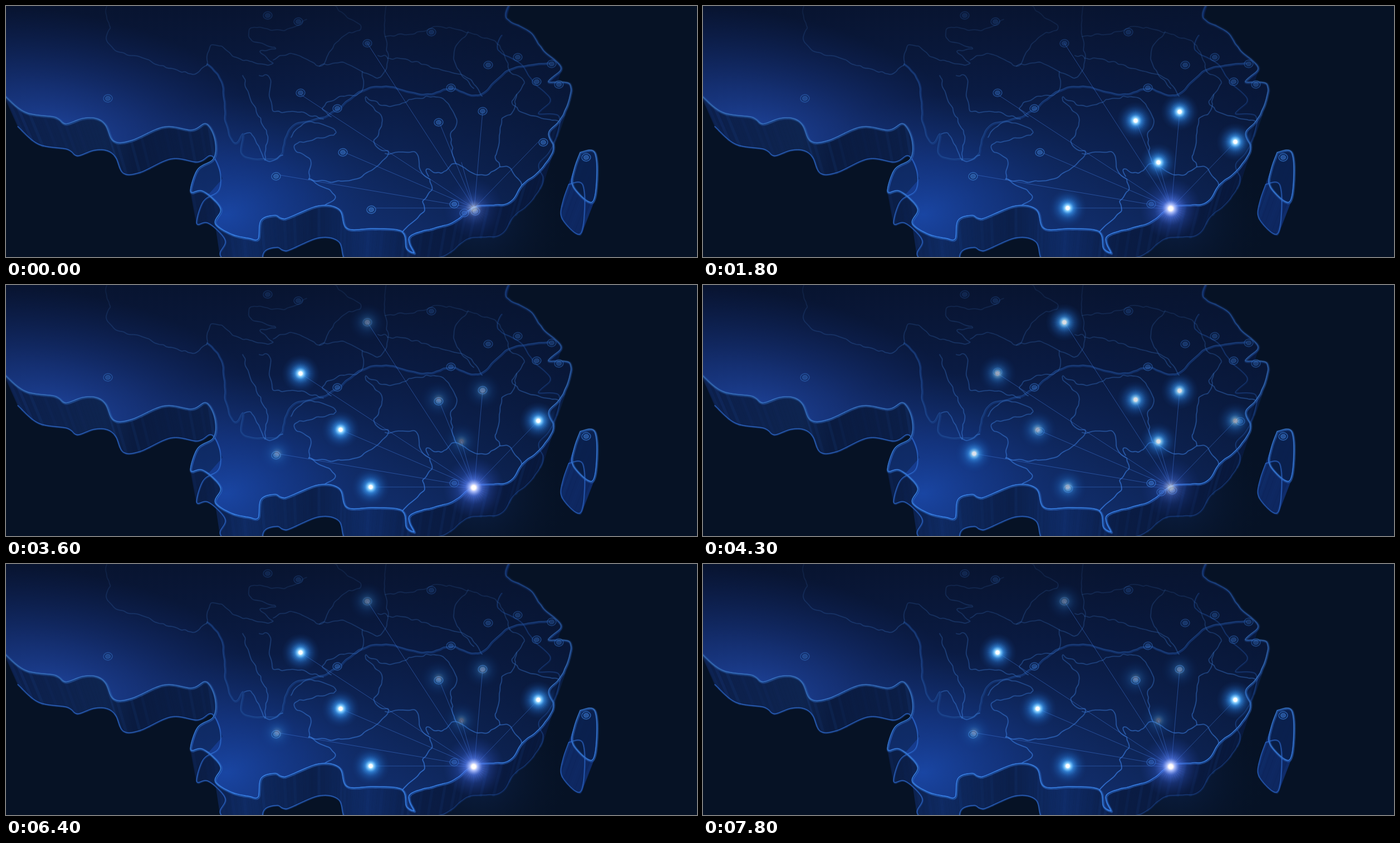
Write an HTML page that moves like this. It is 1241 by 451 pixels and loops after 8000 ms.

```html
<!DOCTYPE html>
<html lang="en">
<head>
<meta charset="utf-8">
<title>Night map</title>
<style>
html, body { margin: 0; width: 100%; height: 100%; overflow: hidden; background: #061225; }
svg { display: block; width: 100vw; height: 100vh; }
path, line { fill: none; stroke-linejoin: round; stroke-linecap: round; }
</style>
</head>
<body>
<svg id="stage" viewBox="0 0 1241 451" preserveAspectRatio="none">
  <defs>
    <linearGradient id="land" gradientUnits="userSpaceOnUse" x1="0" y1="0" x2="0" y2="451">
      <stop offset="0" stop-color="#081430"/><stop offset=".35" stop-color="#0a1b43"/>
      <stop offset=".75" stop-color="#0f285f"/><stop offset="1" stop-color="#123071"/>
    </linearGradient>
    <radialGradient id="southGlow" gradientUnits="userSpaceOnUse" cx="0" cy="0" r="1" gradientTransform="translate(395 375) rotate(-12) scale(320 210)">
      <stop offset="0" stop-color="#1b4aad" stop-opacity=".85"/><stop offset=".45" stop-color="#173f9a" stop-opacity=".48"/>
      <stop offset="1" stop-color="#12306f" stop-opacity="0"/>
    </radialGradient>
    <radialGradient id="westGlow" gradientUnits="userSpaceOnUse" cx="0" cy="0" r="1" gradientTransform="translate(90 235) rotate(10) scale(430 225)">
      <stop offset="0" stop-color="#2047a2" stop-opacity=".95"/><stop offset=".4" stop-color="#1a3a8a" stop-opacity=".65"/>
      <stop offset="1" stop-color="#12296a" stop-opacity="0"/>
    </radialGradient>
    <linearGradient id="eastShade" gradientUnits="userSpaceOnUse" x1="700" y1="0" x2="1010" y2="0">
      <stop offset="0" stop-color="#07142f" stop-opacity="0"/><stop offset="1" stop-color="#07142f" stop-opacity=".55"/>
    </linearGradient>
    <linearGradient id="wall" gradientUnits="userSpaceOnUse" x1="0" y1="0" x2="1000" y2="0">
      <stop offset="0" stop-color="#0c1f4b"/><stop offset=".18" stop-color="#0e244f"/>
      <stop offset=".23" stop-color="#0a1b40"/><stop offset=".36" stop-color="#0b1e47"/>
      <stop offset=".43" stop-color="#0f2a62"/><stop offset=".55" stop-color="#0b1f4a"/>
      <stop offset=".65" stop-color="#0f2b66"/><stop offset=".75" stop-color="#0a1c44"/>
      <stop offset="1" stop-color="#08173a"/>
    </linearGradient>
    <linearGradient id="edge" gradientUnits="userSpaceOnUse" x1="0" y1="0" x2="0" y2="451">
      <stop offset="0" stop-color="#3767a8" stop-opacity=".22"/><stop offset=".4" stop-color="#4582ca" stop-opacity=".75"/>
      <stop offset=".7" stop-color="#3f86e4" stop-opacity=".95"/><stop offset="1" stop-color="#3d8cf8"/>
    </linearGradient>
    <linearGradient id="border" gradientUnits="userSpaceOnUse" x1="0" y1="0" x2="0" y2="400">
      <stop offset="0" stop-color="#2d5590" stop-opacity=".18"/><stop offset=".35" stop-color="#3063ad" stop-opacity=".5"/>
      <stop offset="1" stop-color="#397fe8" stop-opacity=".95"/>
    </linearGradient>
    <radialGradient id="sea" gradientUnits="userSpaceOnUse" cx="850" cy="380" r="170">
      <stop offset="0" stop-color="#12306d" stop-opacity=".45"/><stop offset="1" stop-color="#061225" stop-opacity="0"/>
    </radialGradient>
    <radialGradient id="spark">
      <stop offset="0" stop-color="#fff"/><stop offset=".1" stop-color="#eefaff"/>
      <stop offset=".18" stop-color="#86d0ff" stop-opacity=".95"/><stop offset=".32" stop-color="#3a96ee" stop-opacity=".7"/>
      <stop offset=".55" stop-color="#2470cc" stop-opacity=".4"/><stop offset=".8" stop-color="#1c5cb4" stop-opacity=".13"/>
      <stop offset="1" stop-color="#174f9f" stop-opacity="0"/>
    </radialGradient>
    <radialGradient id="hubSpark">
      <stop offset="0" stop-color="#fff"/><stop offset=".08" stop-color="#fff8f4"/>
      <stop offset=".14" stop-color="#b4c4ff" stop-opacity=".92"/><stop offset=".28" stop-color="#557cf0" stop-opacity=".66"/>
      <stop offset=".55" stop-color="#3158c8" stop-opacity=".34"/><stop offset="1" stop-color="#203d98" stop-opacity="0"/>
    </radialGradient>
  </defs>
</svg>
<script>
const stage = document.getElementById('stage');

function add(tag, attrs, parent = stage) {
  const el = document.createElementNS('http://www.w3.org/2000/svg', tag);
  for (const key in attrs) el.setAttribute(key, attrs[key]);
  parent.append(el);
  return el;
}

let seed = 11;
const random = () => (seed = seed * 16807 % 2147483647) / 2147483647;
const points = text => text.trim().split(/\s+/).map(pair => pair.split(',').map(Number));

// Samples a Catmull-Rom spline through key points and roughens it with seeded jitter.
function trace(text, rough = 0, step = 8) {
  const p = points(text), out = [];
  for (let i = 0; i < p.length - 1; i++) {
    const a = p[i - 1] || p[i], b = p[i], c = p[i + 1], e = p[i + 2] || c;
    const count = Math.ceil(Math.hypot(c[0] - b[0], c[1] - b[1]) / step);
    for (let k = 0; k < count; k++) {
      const t = k / count;
      out.push([0, 1].map(j => b[j] + .5 * t * (c[j] - a[j]
        + t * (2 * a[j] - 5 * b[j] + 4 * c[j] - e[j] + t * (3 * b[j] - a[j] - 3 * c[j] + e[j])))
        + (k ? (random() - .5) * 2 * rough : 0)));
    }
  }
  return [...out, p[p.length - 1]];
}

// Smooth outline through the midpoints of a sampled line.
function outline(p) {
  let d = 'M' + p[0];
  for (let i = 1; i < p.length - 1; i++) {
    d += `Q${p[i]} ${(p[i][0] + p[i + 1][0]) / 2},${(p[i][1] + p[i + 1][1]) / 2}`;
  }
  return d + 'L' + p[p.length - 1];
}

const fill = (d, paint, opacity = 1) => add('path', { d, style: `fill:${paint};opacity:${opacity}` });
const stroke = (d, paint, width, opacity = 1, extra = {}) =>
  add('path', { d, stroke: paint, 'stroke-width': width, opacity, ...extra });

function tube(d) {
  stroke(d, '#2b6bdc', 7, .07);
  stroke(d, 'url(#edge)', 3.6, .55);
  stroke(d, '#10357c', 1.8, .8);
  stroke(d, 'url(#edge)', 1.2, 1, { transform: 'translate(-.8 -.9)' });
}

// The slab is seen from above: its lower rim leans towards the middle of the view.
const sink = ([x, y]) => [x - (x - 565) * .045, y + 57];

function walls(line, paint) {
  for (let i = 1; i < line.length; i++) {
    const a = line[i - 1], b = line[i];
    add('path', { d: `M${a}L${b}L${sink(b)}L${sink(a)}Z`, style: `fill:${paint};stroke:${paint};stroke-width:.6` });
    if (i % 3 === 0) stroke(`M${a}L${sink(a)}`, '#2a62c8', 5, .1 * random(), { 'stroke-linecap': 'butt' });
  }
}

function rim(line, opacity) {
  const d = outline(line.map(sink));
  stroke(d, '#245cc4', 3, .5 * opacity);
  stroke(d, '#3e82e8', 1, .9 * opacity, { transform: 'translate(-.5 -.6)' });
}

const west = trace(`-4,160 35,192 90,201 107,213 138,203 163,203 180,215 194,244 225,243 285,218 335,224 360,212
  376,240 374,275 345,294 332,335 350,332 370,345 387,367 376,391 405,411 440,419 454,420 459,385 487,377 500,384
  562,360 600,367 613,401 660,401 712,406 720,437 734,445`);
const east = trace(`734,445 724,418 747,406 803,390 845,361 903,355 928,322 960,296 984,258 975,229 994,208 1010,176
  1013,140 974,137 998,112 965,80 940,46 898,22 906,-4`, .8);
const island = trace('1032,264 1057,262 1062,305 1053,354 1019,325 1021,295 1032,264');
const coast = outline([...west, ...east]);
const landShape = coast + 'L-5,-5Z';

// Sea, walls and top face
add('rect', { width: 1241, height: 451, fill: '#061225' });
fill('M650,200H1040V451H650Z', 'url(#sea)');
walls(west, 'url(#wall)');
walls(east, 'url(#wall)');
for (const paint of ['land', 'westGlow', 'southGlow', 'eastShade']) fill(landShape, `url(#${paint})`);
fill('M374,275L389,310L365,337L332,335L345,294Z', '#0c2352', .6);
rim(west, .8);
rim(east, .3);

// River and borders
const river = outline(trace(`362,105 388,137 396,212 413,248 426,229 425,268 467,276 494,268 513,218 580,196 640,153
  690,146 750,160 801,149 850,161 905,115 975,103`, 1.5));
stroke(river, '#1b458d', 4, .5);
stroke(river, '#3468b0', 1, .4, { transform: 'translate(-1 -1)' });

const northBorders = [
  '182,-2 181,24 188,40 180,60 205,83 245,93 270,105 308,115 335,123 360,107',
  '360,107 366,74 388,72 407,91 432,97 452,104 480,103 455,81 485,77 440,60 445,38 500,45 540,24',
  '480,97 515,86 563,108 576,92 603,56 638,39 610,17 585,-3',
  '563,108 610,103 669,129 686,94 668,89',
  '686,94 725,98 785,116 830,130 855,162',
  '683,-2 681,55 686,94',
  '681,55 745,46 785,38 870,60 893,82 905,118',
  '830,46 806,77 808,106 840,148'
];
const southBorders = [
  '640,118 638,155 595,165 568,183 584,199',
  '425,125 449,190 468,230 465,277',
  '455,125 475,132 478,185 525,191 570,203',
  '428,230 440,228 467,277 497,268',
  '512,236 540,208 593,228 525,246 522,263 546,274 544,311',
  '544,311 601,315 641,305 687,266 662,248 676,206 645,165 688,181 735,166 785,166 810,211 798,235 808,283',
  '544,311 582,330 592,345 573,358',
  '681,265 735,262 742,289 765,323 748,350 752,365 712,406',
  '759,306 754,293 782,301 808,283 846,304 887,289 878,270 886,240 890,203 910,190 917,159',
  '887,289 907,292 926,321',
  '905,118 932,138 908,171 935,194 992,207'
];
for (const text of [...northBorders, ...southBorders]) {
  const d = outline(trace(text, 2.6, 7));
  stroke(d, 'url(#border)', 2.8, .2);
  stroke(d, 'url(#border)', 1.3, .85);
}
tube(coast);

// Island
walls(island, '#0e2760');
fill(outline(island), '#0a1f4b', .85);
rim(island, .7);
tube(outline(island));

// x, y, first lit (ms), bright in the first half of the pulse
const hub = { x: 840, y: 364, start: -200, first: true };
const nodes = [
  [818, 281, 200, false], [655, 363, 600, true], [956, 244, 1000, true],
  [856, 190, 1400, false], [777, 206, 1600, false], [601, 260, 2000, true],
  [487, 303, 2400, false], [529, 159, 2800, true], [649, 67, 3200, false]
].map(([x, y, start, first]) => ({ x, y, start, first }));
nodes.push(hub);

for (const { x, y } of nodes) {
  add('line', { x1: x, y1: y, x2: hub.x + 1, y2: hub.y - 1, stroke: '#4279dd', 'stroke-width': 1, opacity: .48 });
}

// A ring fades as the star over it lights up.
const rings = points(`183,166 485,306 605,263 656,366 529,156 595,184 649,67 777,209 799,147 856,189 866,106 919,92
  953,136 993,141 980,104 965,245 1042,272 805,356 823,372 843,369 470,17 525,28 764,47`).map(([x, y]) => {
  const g = add('g', { transform: `translate(${x} ${y}) rotate(-8)` });
  add('ellipse', { rx: 8, ry: 6.7, fill: '#102d67', 'fill-opacity': .5, stroke: '#2e65b4', 'stroke-width': 1.5 }, g);
  add('ellipse', { rx: 4.4, ry: 3.7, fill: '#28569f', stroke: '#4080cd', 'stroke-width': .8 }, g);
  const covers = nodes
    .map(node => ({ node, amount: Math.min(1, Math.max(0, (54 - Math.hypot(node.x - x, node.y - y)) / 36)) }))
    .filter(cover => cover.amount > 0);
  return { g, covers, strength: Math.min(1, .22 + y / 400) };
});

function star({ x, y }, radius, paint) {
  const g = add('g', { transform: `translate(${x} ${y})` });
  const rays = 32;
  const at = (r, a) => (r * Math.cos(a)).toFixed(1) + ',' + (r * Math.sin(a)).toFixed(1);
  let d = '';
  for (let i = 0; i < rays; i++) {
    const angle = i * 2 * Math.PI / rays;
    const reach = radius * (i % 8 === 0 ? .82 : .5 + .24 * random());
    d += `M${at(reach, angle)}L${at(3, angle + .3)}L${at(3, angle - .3)}Z`;
  }
  add('circle', { r: radius, fill: `url(#${paint})` }, g);
  add('path', { d, style: `fill:url(#${paint});opacity:.5` }, g);
  add('circle', { r: 3.4, fill: '#fff' }, g);
  return g;
}
for (const node of nodes) {
  node.glow = node === hub ? star(node, 55, 'hubSpark') : star(node, 34, 'spark');
}

const LOOP = 8000, PULSE_START = 3600, PULSE = 700, STEP = 200;

function level({ start, first }, t) {
  if (t >= PULSE_START) {
    const second = Math.floor((t - PULSE_START) / PULSE) % 2;
    return first ? (second ? .55 : 1) : (second ? .85 : .28);
  }
  return t < start ? 0 : t < start + STEP ? .5 : 1;
}

function draw() {
  const t = performance.now() % LOOP;
  for (const node of nodes) {
    // The hub opens half lit, like every star in its first step.
    node.level = level(node, node === hub && t < STEP ? t - STEP : t);
    node.glow.setAttribute('opacity', node.level);
  }
  for (const { g, covers, strength } of rings) {
    const hidden = covers.reduce((most, c) => Math.max(most, c.amount * c.node.level), 0);
    g.setAttribute('opacity', strength * Math.min(1, 1.6 * (1 - hidden)));
  }
  requestAnimationFrame(draw);
}
draw();
</script>
</body>
</html>
```
